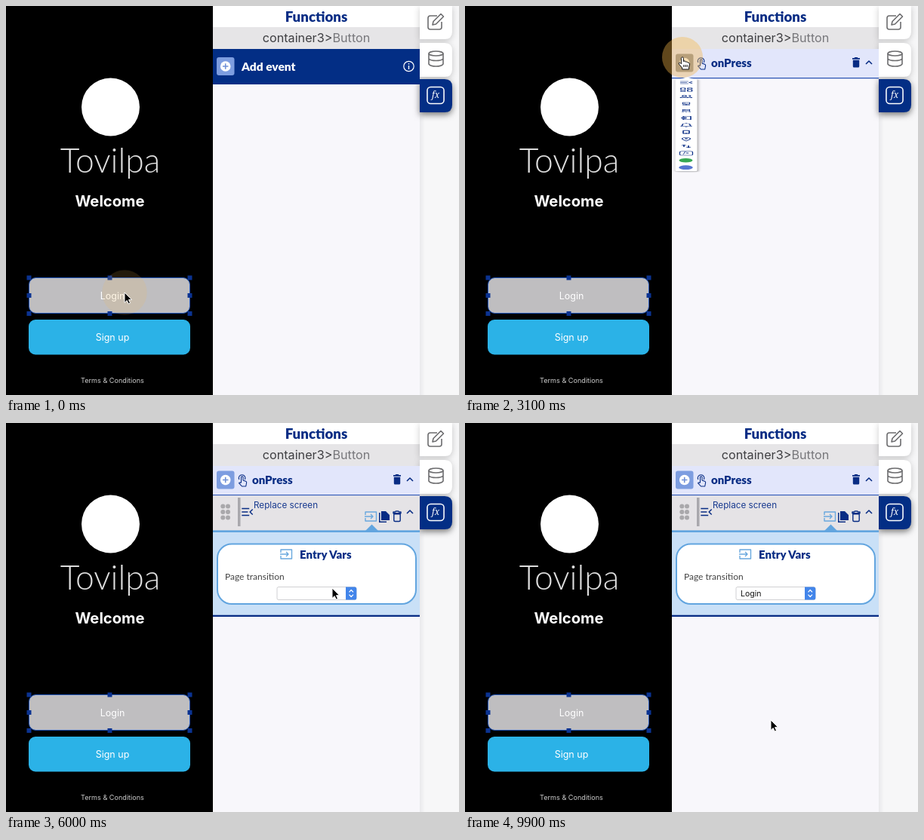
These frames come from a looping animation (600 by 516 pixels, 10000 ms). An HTML page:

```html
<!DOCTYPE html>
<html lang="en">
<head>
<meta charset="utf-8">
<title>Button event editor</title>
<style>
  html, body { margin: 0; width: 100%; height: 100%; overflow: hidden; background: #f8f7fb; }
  svg { display: block; width: 600px; height: 516px; stroke-width: 1.6; }
  text { font-family: Lato, sans-serif; font-size: 12px; fill: #17398f; }
  .bold { font-weight: 900; font-size: 15px; fill: #082c84; }
  .ui { font-family: Inter, sans-serif; fill: #fff; }
  .mid { text-anchor: middle; }
  .item { font-size: 10.3px; font-weight: 500; }
  .line { fill: none; stroke: currentColor; stroke-linejoin: round; }
  .solid { fill: currentColor; }
  .navy { color: #082c84; }
  .raised { filter: drop-shadow(1px 2px 2px #0006); }
  .tab { filter: drop-shadow(0 2px 4px #0003); }
  .active { filter: drop-shadow(0 3px 4px #0008); }
</style>
</head>
<body>
<svg viewBox="0 0 600 516">
  <defs>
    <linearGradient id="edge"><stop stop-color="#e9e9ec"/><stop offset="1" stop-color="#f7f7f8"/></linearGradient>
    <linearGradient id="smoke" x2="0" y2="1"><stop stop-color="#75797e"/><stop offset=".18" stop-color="#66676a"/><stop offset="1" stop-color="#646466"/></linearGradient>
    <g id="nav" class="line"><path d="M-8-5H3M-8 0H1M-8 5H3M8-4L4 0L8 4"/></g>
    <g id="grid" class="line"><path d="M-7-7H-1.5V.5H-7ZM2-7H7.5V-3H2ZM2 .5H7.5V7.5H2ZM-7 4H-1.5V7.5H-7Z"/></g>
    <g id="people" class="line"><circle cx="-2.5" cy="-3" r="2.6"/><path d="M-7.5 5V3C-6 .8 1 .8 2.5 3V5ZM3-5.6A2.6 2.6 0 0 1 3-.4M4 1.3Q7.5 2 7.5 5H4"/></g>
    <g id="server" class="line" stroke-width="1.2"><path d="M-4.500-6H4.500V-2H-4.500ZM-4.500-2H4.500V2H-4.500ZM0 2V6M-5 6H5M-3-4H-1M-3 0H-1"/></g>
    <g id="cluster" class="line" stroke-width="1.2"><path d="M-4.500-6H4.500V-2H-4.500ZM-4.500-2H4.500V2H-4.500ZM-3-4H-1M-3 0H-1M-6 5.500H-3M-1.500 5.500H1.500M3 5.500H6"/></g>
    <g id="device" class="line"><path d="M-4-4V-7H6V7H-4V4"/><circle cx="-3" r="2.600"/><path d="M-7 0H1M-3-4V4" stroke-width="1"/></g>
    <g id="bell" class="line"><path d="M-7 5H7L5 2V-2C5-8-5-8-5-2V2ZM-1.500 7.500H1.500M0-8V-6"/></g>
    <g id="phone" class="line"><rect x="-4" y="-7.500" width="8" height="15" rx="1.500"/><path d="M-4-5H4M-4 4H4M-1 6H1"/></g>
    <g id="pin" class="line"><path d="M0 8C-4 3-5.500 1-5.500-2A5.500 5.500 0 0 1 5.500-2C5.500 1 4 3 0 8Z"/><circle cy="-2" r="1.300"/></g>
    <g id="swap" class="line"><path d="M-3 3V-6M-6-3L-3-6L0-3M3-3V6M0 3L3 6L6 3"/></g>
    <g id="fx"><rect class="line" x="-8.500" y="-8.500" width="17" height="17" rx="3.500" stroke-width="1.200"/>
      <text class="mid" y="3" style="font:italic 500 9px 'Noto Serif',serif;fill:currentColor">fx</text></g>
    <g id="tap" class="line" stroke-width="1.100"><path d="M-4.200-1A4.300 4.300 0 1 1 3.400-1M-1.500 3V-4A1.200 1.200 0 0 1 1-4V0L5 1.500Q6 2 5.500 4L4.700 8H-.500L-4.500 3.700Q-3.500 2.200-1.500 3.600"/></g>
    <path id="bin" d="M-5-6H-2.500L-1.700-7H1.700L2.500-6H5V-4.300H-5ZM-4.200-3.300H4.200V5Q4.200 6.500 2.700 6.500H-2.700Q-4.200 6.500-4.200 5Z"/>
    <g id="enter" class="line" stroke-width="1.400"><path d="M-7-2V-6H7.500V6H-7V2M-8 0H3M0-3L3 0L0 3"/></g>
    <path id="up" class="line" d="M-4 2L0-2L4 2"/>
  </defs>

  <rect width="600" height="516" fill="#f8f7fb"/>

  <!-- phone preview -->
  <rect width="274" height="516"/>
  <circle cx="138.500" cy="134" r="38.500" fill="#fff"/>
  <text class="mid" x="138" y="221" style="font-size:44.5px;font-weight:300;fill:#ddd">Tovilpa</text>
  <text class="ui mid" x="137.500" y="265.500" style="font-size:20.2px;font-weight:700">Welcome</text>
  <rect x="30.500" y="360.500" width="213" height="47" rx="9" fill="#bfbec0" stroke="#2458bd" stroke-width="1"/>
  <text class="ui mid" x="141" y="388.500" style="font-size:12.5px">Login</text>
  <g id="handles" fill="#0b3391"></g>
  <rect x="30" y="416" width="214" height="46.500" rx="9" fill="#2bb2e7"/>
  <text class="ui mid" x="141" y="443.500" style="font-size:12.5px">Sign up</text>
  <text class="ui mid" x="141" y="499.500" style="font-size:9.1px;fill:#ccc">Terms &amp; Conditions</text>

  <!-- panel header -->
  <rect x="274" width="274" height="28" fill="#fff"/>
  <text class="bold mid" x="411" y="21" style="font-size:18.7px">Functions</text>
  <rect x="274" y="28" width="274" height="29" fill="#e6e5e7"/>
  <text class="ui mid" x="411" y="48" style="font-size:16.2px;fill:#3f3f42">container3&gt;<tspan fill="#77777b">Button</tspan></text>

  <!-- side tabs -->
  <rect x="548" width="52" height="516" fill="#f7f7f8"/>
  <rect x="548" width="7" height="516" fill="url(#edge)"/>
  <g class="tab" fill="#fff">
    <path d="M548 0H591V34Q591 44 581 44H548Z"/>
    <path d="M548 49H581Q591 49 591 59V84Q591 94 581 94H548Z"/>
  </g>
  <path class="active" fill="#032e85" d="M548 97H581Q591 97 591 107V131Q591 141 581 141H548Z"/>
  <g color="#6c6c6e" class="line">
    <path d="M571 13H562Q559 13 559 16V28Q559 31 562 31H574Q577 31 577 28V21M565 25L566 20.500L576 10.500L579.500 14L569.500 24Z"/>
    <ellipse cx="569.500" cy="63" rx="9.500" ry="3"/>
    <path d="M560 63V77Q562 80 569.500 80T579 77V63M560 70Q562 72.500 569.500 72.500T579 70"/>
  </g>
  <use href="#fx" transform="translate(569 118.500) scale(1.3)" color="#fff"/>

  <!-- event rows -->
  <g id="addRow">
    <rect x="274" y="57" width="274" height="47" fill="#032e85"/>
    <text class="bold" x="312" y="85.500" style="font-size:15.5px;fill:#fff">Add event</text>
    <circle class="line" cx="533.500" cy="80" r="6.700" color="#fff" stroke-width="1.200"/>
    <path d="M533.500 79V84M533.500 76V77.600" stroke="#fff" stroke-width="1.400"/>
  </g>
  <g id="pressRow" class="navy">
    <rect x="274" y="57" width="274" height="38" fill="#e2e6fb"/>
    <rect x="274" y="95" width="274" height="1.300" fill="#2f57b5"/>
    <use href="#tap" x="313" y="76"/>
    <text class="bold" x="326" y="81">onPress</text>
    <use href="#bin" class="solid" x="518" y="75"/>
    <use href="#up" x="535" y="75"/>
  </g>
  <g id="plus">
    <rect id="plusBox" x="279" y="68" width="23.500" height="24" rx="3"/>
    <circle cx="290.700" cy="80" r="6.800" fill="#fff"/>
    <path d="M287 80H294.400M290.700 76.300V83.700" stroke="#6f90d6"/>
  </g>

  <g id="actionRow" class="navy">
    <rect x="274" y="96.500" width="274" height="46" fill="#e5e3e6"/>
    <g id="dots" fill="#a9a8ab"></g>
    <rect x="307" y="99" width="3.500" height="38" fill="#a9a8ad"/>
    <use href="#nav" transform="translate(319.500 118) scale(.9)"/>
    <text class="ui" x="328" y="113" style="font-size:11.7px;fill:#17398f">Replace screen</text>
    <use href="#enter" x="483" y="124" color="#69a8de"/>
    <path class="solid" d="M494 119H495.500V130.500H504V132H494ZM497 117H503L508 122V129H497Z"/>
    <use href="#bin" x="518" y="124" class="line" stroke-width="1.400"/>
    <use href="#up" x="535" y="118"/>
    <rect x="274" y="142.300" width="274" height="2.700" fill="#62a5df"/>
  </g>
  <g id="vars">
    <path d="M476 143L484.500 134.500L493 143Z" fill="#62a5df"/>
    <rect x="274" y="145" width="274" height="110" fill="#c9e0f7"/>
    <rect x="274" y="254.700" width="274" height="2.300" fill="#082c84"/>
    <rect x="280" y="160.500" width="263" height="79.500" rx="19" fill="#fff" stroke="#62a5df" stroke-width="2"/>
    <use href="#enter" x="371" y="174" color="#69a8de"/>
    <text class="bold" x="389" y="179.500">Entry Vars</text>
    <text x="290" y="207.500" style="fill:#444">Page transition</text>
    <rect x="359" y="217.500" width="105" height="17" rx="2" fill="#fff" stroke="#c4c4c8" stroke-width=".8"/>
    <path d="M450 217.500H462Q464.300 217.500 464.300 220V232Q464.300 234.500 462 234.500H450Z" fill="#4285ea"/>
    <path class="line" color="#fff" stroke-width="1.200" d="M454.500 224.300L457.200 221.500L460 224.300M454.500 227.700L457.200 230.500L460 227.700"/>
    <text id="chosen" class="ui" x="365" y="230" style="font-size:10.5px;fill:#111">Login</text>
  </g>

  <!-- pop-ups -->
  <g id="pressPop" class="navy">
    <path d="M286 102L294.500 93L303 102Z" fill="#fff"/>
    <rect id="popBox" class="raised" x="279" y="102" height="30.500" fill="#e2e5f8"/>
    <use href="#tap" x="293" y="116"/>
    <svg x="304" y="102" width="72" height="30" style="width:72px;height:30px"><text id="popText" class="bold" y="20" text-anchor="end">onPress</text></svg>
  </g>
  <g id="subMenu" class="navy">
    <rect class="raised" x="306" y="100" width="138" height="110" rx="4" fill="#fcfcff"/>
    <rect id="subMark" x="307" width="137" height="22.500" fill="#e2e6fb"/>
    <text class="bold" x="317" y="125">Navigation</text>
    <use href="#up" transform="translate(434.500 120) scale(1 -1)"/>
    <g id="subItems"></g>
  </g>
  <g id="menu" class="navy">
    <path d="M285 97L294 88.500L303 97Z" fill="#fff"/>
    <rect class="raised" x="278.500" y="97" width="29" height="394" rx="3" fill="#fff"/>
    <rect id="menuMark" x="278.500" y="97" width="29" height="30" fill="#e2e6fb"/>
    <g id="menuIcons"></g>
    <circle cx="292.500" cy="444.500" r="9" fill="#35a853"/>
    <circle cx="292.500" cy="475" r="9.300" fill="#5576d0"/>
  </g>
  <g id="select">
    <rect class="raised" x="348" y="213" width="121" height="320" rx="5" fill="url(#smoke)"/>
    <rect id="selectMark" x="348" width="121" height="15.200" fill="#4a90fb"/>
    <path class="line" color="#fff" d="M354.500 226L357 229L361.500 221.500"/>
    <g id="options"></g>
  </g>

  <circle id="ripple" fill="#f5b548"/>
  <g id="cursor" stroke-linejoin="round" stroke-width="1">
    <path id="arrow" stroke="#fff" d="M0 0V13.500L3.200 10.600L5.200 15L7.500 14L5.500 9.700H9.600Z"/>
    <path id="hand" fill="#fff" stroke="#111" d="M-1.600 1.400C-1.600-.6 1.400-.6 1.400 1.400V5.500C2.400 4.800 4 5 4.200 6.200C5.400 5.600 6.800 6 7 7.200C8.600 6.800 9.600 7.600 9.500 9L8.600 13V16H-.4V14L-4.600 9C-5.600 7.400-3.600 6.400-2.600 7.600L-1.600 8.800ZM1.800 10V13M4 10V13M6.200 10V13"/>
  </g>
</svg>

<script>
const LOOP = 10000, STEP = 100, ROW = 15.2;
const el = id => document.getElementById(id);
const attr = (id, values) => { for (const k in values) el(id).setAttribute(k, values[k]); };
const show = (id, on) => { el(id).style.display = on ? '' : 'none'; };
const fill = (id, list, markup) => { el(id).innerHTML = list.map(markup).join(''); };
const clamp = (v, lo = 0, hi = 1) => Math.min(hi, Math.max(lo, v));
const ramp = (t, from, to) => clamp((t - from) / (to - from));
const within = (t, from, to) => t >= from && t < to;

const grid = (xs, ys) => ys.flatMap(y => xs.map(x => [x, y]));
fill('handles', grid([30.5, 137.5, 243.5], [360.5, 384, 408]).filter((_, i) => i !== 4),
  ([x, y]) => `<rect x="${x - 3}" y="${y - 3}" width="6" height="6"/>`);
fill('dots', grid([287.3, 294], [110.5, 118, 125.5]),
  ([x, y]) => `<circle cx="${x}" cy="${y}" r="3"/>`);
fill('menuIcons', 'nav grid people server cluster device bell phone pin swap fx'.split(' '),
  (id, i) => `<use href="#${id}" x="293" y="${111.5 + 30.3 * i}"/>`);
fill('subItems', ['Return to last Screen', 'Push Screen', 'Replace screen'],
  (s, i) => `<use href="#nav" transform="translate(318.5 ${149 + 22.8 * i}) scale(.7)"/>
    <text x="330" y="${152.7 + 22.8 * i}">${s}</text>`);
fill('options', ['Add favorites', 'Chat', 'Comment', 'Diferent 2', 'Diferent 3', 'Drivers list',
  'Favorites', 'Favorites1', 'Home', 'Loader', 'Login', 'Notification', 'On the way', 'Profile',
  'Profile 1', 'Register', 'Request a cab', 'Request a cab 2', 'Request a cab 3'],
  (s, i) => `<text class="ui item" x="368" y="${245.7 + ROW * i}">${s}</text>`);

// pointer stops: time, x, y
const path = [
  [0, 157, 380], [250, 157, 380], [950, 290, 78], [1100, 290, 78], [1300, 295, 109],
  [2200, 295, 109], [2700, 288, 68], [3300, 288, 68], [3700, 292, 110], [4000, 292, 110],
  [4400, 350, 150], [4800, 382, 182], [5000, 384, 194], [5250, 384, 194], [5550, 484, 126],
  [5750, 484, 126], [6000, 432, 219], [6400, 432, 219], [7200, 416, 337], [8100, 405, 394],
  [LOOP, 405, 394]
];
const clicks = [-250, 900, 1700, 2950, 3750, 5050, 5550, 6150, 8200];

function pointer(t) {
  const i = path.findIndex(p => p[0] > t);
  const [t0, x0, y0] = path[i - 1], [t1, x1, y1] = path[i];
  const p = ramp(t, t0, t1), e = p * p * (3 - 2 * p);
  return [x0 + (x1 - x0) * e, y0 + (y1 - y0) * e];
}

function draw(t) {
  const [x, y] = pointer(t);

  show('addRow', t < 1900);
  show('pressRow', t >= 1900);
  attr('plus', { transform: `translate(0 ${t < 1900 ? 0 : -4.5})` });
  attr('plusBox', { fill: within(t, 2700, 3300) ? '#8f919b' : '#7d9de0' });

  const popWidth = 31 + 66 * ramp(t, 1300, 1500);
  show('pressPop', within(t, 1100, 1900));
  attr('popBox', { width: popWidth });
  attr('popText', { x: popWidth - 25 });

  const open = ramp(t, 3007, 3307);
  show('menu', within(t, 3000, 5200));
  attr('menu', { transform: `translate(0 97) scale(1 ${open}) translate(0 -97)` });
  show('menuMark', t >= 3700);
  show('subMenu', within(t, 3800, 5200));
  attr('subMenu', { transform: `translate(307 0) scale(${ramp(t, 3700, 4000)} 1) translate(-307 0)` });
  show('subMark', t >= 4300);
  attr('subMark', { y: 137.5 + 22.7 * clamp(Math.floor((y - 137.5) / 22.7), 0, 2) });

  show('actionRow', t >= 5300);
  show('vars', t >= 5700);
  show('chosen', t >= 8500);
  show('select', within(t, 6300, 8700));
  attr('select', { opacity: 1 - ramp(t, 8400, 8700) });
  show('selectMark', !within(t, 8300, 8400));
  attr('selectMark', { y: 234.2 + ROW * Math.floor((y - 234.2) / ROW) });

  const age = Math.min(...clicks.map(c => t - c).filter(a => a >= 0));
  show('ripple', age < 400);
  attr('ripple', { cx: x, cy: y, r: Math.min(30, 23 + age * .027), opacity: (1 - ramp(age, 0, 400)) ** 2 });

  const overLink = within(t, 950, 5250) || within(t, 5400, 5800);
  attr('cursor', { transform: `translate(${x} ${y})` });
  show('hand', overLink);
  show('arrow', !overLink);
}

function tick() {
  draw(Math.floor(performance.now() % LOOP / STEP) * STEP);
  requestAnimationFrame(tick);
}
tick();
</script>
</body>
</html>
```
